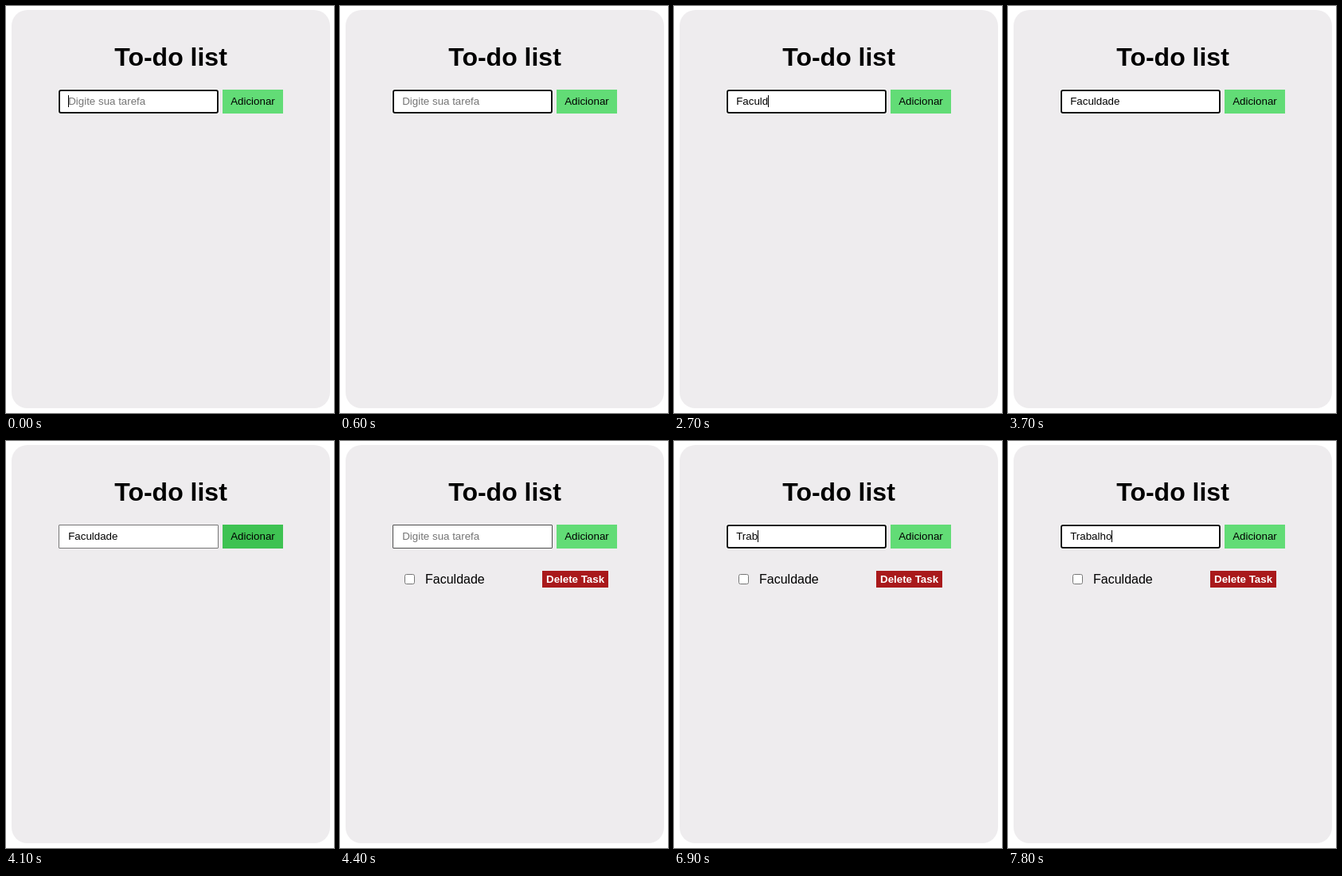
Recreate the animation shown at these times as an HTML page. Size 412x511 px, loop 8 s.

```html
<!DOCTYPE html>
<html lang="pt-BR">
<head>
<meta charset="utf-8">
<title>To-do list</title>
<style>
  html, body { margin: 0; width: 100%; height: 100%; overflow: hidden; background: #fff; }
  body { position: relative; font: 13.3333px "Liberation Sans", Arial, sans-serif; color: #000; }
  body * { box-sizing: border-box; }
  .panel, h1, .field, .entry, .button, .task > * { position: absolute; margin: 0; white-space: pre; }
  .panel { left: 7px; top: 5px; width: 400px; height: 500px; border-radius: 20px; background: #eeecee; }
  h1 { left: 7px; top: 46px; width: 400px; font-size: 32px; line-height: 37px; text-align: center; }
  .field { left: 66px; top: 105px; width: 201px; height: 30px; border: 1px solid #767676; border-radius: 1px; background: #fff; }
  .field.hover { border-color: #4f4f4f; }
  .field.focus { border: 2px solid #101010; border-radius: 3px; box-shadow: 0 0 0 1px #fff; }
  .entry { left: 78.2px; top: 112px; height: 15px; line-height: 15px; }
  .caret { display: inline-block; width: 1px; height: 15px; margin-right: -1px; vertical-align: top; background: #000; }
  .hint { color: #757575; }
  .button { left: 272px; top: 105px; width: 76px; height: 30px; padding: 7px 0 0 10.2px; line-height: 15px; background: #62dc76; }
  .button.hover { background: #3ec252; }
  .task input { left: 81px; top: 167px; width: 13px; height: 13px; }
  .task .name { left: 107px; top: 164px; font-size: 16px; line-height: 19px; }
  .task .delete { left: 254px; top: 163px; width: 83px; height: 21px; padding: 3px 0 0 5px; font-weight: bold; line-height: 15px; color: #fff; background: #a9191b; }
</style>
</head>
<body>
  <div class="panel"></div>
  <h1>To-do list</h1>
  <div class="field"></div>
  <div class="entry"><span class="typed"></span><i class="caret"></i><span class="hint">Digite sua tarefa</span></div>
  <div class="button">Adicionar</div>
  <div class="task">
    <input type="checkbox" tabindex="-1">
    <span class="name">Faculdade</span>
    <span class="delete">Delete Task</span>
  </div>
<script>
  const LOOP = 8000, BLINK = 600;
  const HOVER_ADD = 3900, PRESS = 4100, ADDED = 4200, HOVER_FIELD = 4400, REFOCUS = 4800;
  const words = [
    { text: 'Faculdade', keys: [1200, 1400, 2100, 2200, 2500, 2700, 2800, 3000, 3100] },
    { text: 'Trabalho', keys: [6300, 6500, 6700, 6900, 7100, 7300, 7600, 7800] }
  ];
  // Times at which the caret restarts its blink cycle
  const restarts = [-300, ...words[0].keys, REFOCUS, ...words[1].keys];

  const $ = selector => document.querySelector(selector);
  const field = $('.field'), typed = $('.typed'), caret = $('.caret');
  const hint = $('.hint'), button = $('.button'), task = $('.task');

  function draw(t) {
    const { text, keys } = words[t < ADDED ? 0 : 1];
    const value = text.slice(0, keys.filter(k => k <= t).length);
    const focused = t < PRESS || t >= REFOCUS;
    const restart = restarts.filter(k => k <= t).pop();
    const lit = Math.floor((t - restart) / BLINK) % 2 === 0;

    if (typed.textContent !== value) typed.textContent = value;
    hint.hidden = value !== '';
    caret.style.visibility = focused && lit ? 'visible' : 'hidden';
    field.classList.toggle('focus', focused);
    field.classList.toggle('hover', t >= HOVER_FIELD && !focused);
    button.classList.toggle('hover', t >= HOVER_ADD && t < HOVER_FIELD);
    task.hidden = t < ADDED;
  }

  const start = performance.now();
  function tick() {
    draw((performance.now() - start) % LOOP);
    requestAnimationFrame(tick);
  }
  tick();
</script>
</body>
</html>
```
